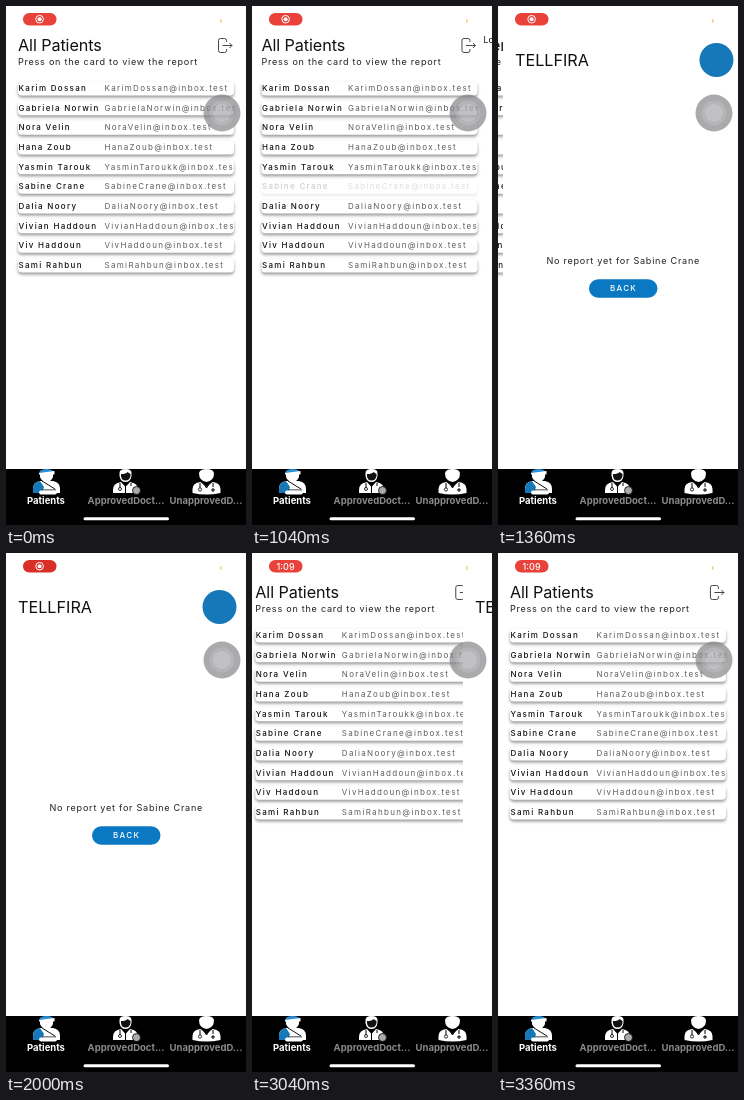
Write an HTML page that moves like this. It is 240 by 519 pixels and loops after 3.44 s.

```html
<!DOCTYPE html>
<html lang="en">
<head>
<meta charset="utf-8">
<style>
  html, body { margin: 0; width: 100%; height: 100%; overflow: hidden; background: #fff; }
  svg { display: block; }
  text { font-family: Inter, "Open Sans", sans-serif; fill: #111; white-space: pre; }
  .title { font-size: 16.2px; font-weight: 380; letter-spacing: -.1px; }
  .body { font-size: 9.1px; letter-spacing: .73px; fill: #222; }
  .cell { font-size: 8px; letter-spacing: 1.33px; }
  .name { font-weight: 500; letter-spacing: 1.3px; }
  .mail { fill: #5c5c5c; }
  .mid { text-anchor: middle; }
  .tab { font-size: 9.5px; font-weight: 700; fill: #8a8a8a; }
  .card { fill: #fff; filter: drop-shadow(0 2.2px 1.4px rgba(0, 0, 0, .4)); }
</style>
</head>
<body>
<svg width="240" height="519" viewBox="0 0 240 519">
  <rect width="240" height="519" fill="#fff"/>

  <g id="list">
    <text class="title" x="12" y="45">All Patients</text>
    <text class="body" x="12" y="59">Press on the card to view the report</text>
    <path d="M220.500 36v-1.500q0-2-2-2h-4q-2 0-2 2v10q0 2 2 2h4q2 0 2-2v-1.500M216.500 39.500h9.500m-2.500-2.500 2.500 2.500-2.500 2.500"
      fill="none" stroke="#333" stroke-width=".9"/>
    <g id="rows"></g>
  </g>

  <g id="report">
    <rect y="24" width="240" height="440" fill="#fff"/>
    <text id="loading" x="0" y="37" style="font-size:8.6px">Loading...</text>
    <g id="content">
      <text class="title" x="12" y="59.6" style="letter-spacing:0">TELLFIRA</text>
      <circle cx="213.5" cy="54" r="17" fill="#1678b8"/>
      <text class="body mid" x="120.3" y="258">No report yet for Sabine Crane</text>
      <g id="back">
        <rect x="86" y="273.3" width="68.5" height="18.5" rx="9.25" fill="#0a78c2"/>
        <text class="cell mid" x="120.6" y="285.4" style="fill:#fff;font-weight:500">BACK</text>
      </g>
    </g>
  </g>

  <!-- status bar -->
  <rect id="pill" x="17" y="7" width="33.5" height="12.5" rx="6.25"/>
  <g id="record">
    <circle cx="33.6" cy="13.2" r="3.8" fill="none" stroke="#fff" stroke-width="1"/>
    <circle cx="33.6" cy="13.2" r="2" fill="#fff"/>
  </g>
  <text id="clock" class="mid" x="33.6" y="16.5" style="font-size:9px;font-weight:500;fill:#fff">1:09</text>
  <rect x="214" y="13" width="1.6" height="4" rx=".8" fill="#f3cf8c"/>

  <!-- floating touch button -->
  <circle cx="216" cy="107" r="18.5" fill="#858588" fill-opacity=".69"/>
  <circle cx="216" cy="107" r="12.5" fill="#fff" fill-opacity=".13"/>
  <circle cx="216" cy="107" r="9" fill="#fff" fill-opacity=".17"/>

  <!-- tab bar -->
  <rect y="463" width="240" height="56" fill="#000"/>
  <g>
    <path d="M34 468h13v3q-2 5-6.5 5t-6.5-5z" fill="#fff"/>
    <path d="M33 467q1-4 7.5-4t8 4z" fill="#2b8fd6"/>
    <path d="M33 467l15.5-2v3.5h-15.5z" fill="#fff"/>
    <path d="M27 487v-4q0-7 7-8h13q7 1 7 8v4z" fill="#fff"/>
    <path d="M27 487v-4q0-7 7-8l4 6-2 6z" fill="#1678b8"/>
    <path d="M36 475l13 8M36 484h14" fill="none" stroke="#111" stroke-width="1"/>
    <rect x="33" y="484.5" width="18" height="4" rx="2" fill="#fff"/>
  </g>
  <g>
    <path d="M113.5 467q0-4 6-4t6 4v3q-1 6-6 6t-6-6z" fill="#fff"/>
    <path d="M115 468q5 0 6.500-2l3 2v2q-1 4.500-5 4.500t-4.500-4.500z" fill="#111"/>
    <path d="M107 487v-3q0-7 8-8l4.500 5 4.500-5q8 1 8 8v3z" fill="#fff"/>
    <path d="M119.500 480v7M114 477v5m11-5v3" stroke="#000" stroke-width="1"/>
    <circle cx="114" cy="483" r="1.500" fill="none" stroke="#000" stroke-width=".8"/>
    <circle cx="130.500" cy="484.500" r="4" fill="#aaa" stroke="#000" stroke-width=".8"/>
  </g>
  <g>
    <path d="M193 467q1-4 7.500-4t7.500 4q0 8-7.500 9-7.500-1-7.500-9z" fill="#fff"/>
    <path d="M186.500 487v-4q0-6 8-7l6 5 6-5q8 1 8 7v4q-14 3-28 0z" fill="#fff"/>
    <path d="M194 477v5m13-5v4M198 478l2.500 4 2.500-4" fill="none" stroke="#000" stroke-width="1"/>
    <circle cx="194" cy="483.500" r="1.600" fill="none" stroke="#000" stroke-width=".8"/>
    <path d="M205 484h4m-2-2v4" stroke="#000" stroke-width="1"/>
  </g>
  <text class="tab mid" x="40" y="497.5" style="fill:#fff">Patients</text>
  <text class="tab mid" x="120" y="497.5">ApprovedDoct...</text>
  <text class="tab mid" x="200" y="497.5">UnapprovedD...</text>
  <rect x="77.5" y="511.2" width="85.5" height="3" rx="1.5" fill="#fff"/>
</svg>

<script>
const LOOP = 3440, STEP = 80, WIDTH = 240;
const PUSH = 1023, POP = 2828;
const $ = id => document.getElementById(id);

const patients = ["Karim Dossan", "Gabriela Norwin", "Nora Velin", "Hana Zoub", "Yasmin Tarouk",
  "Sabine Crane", "Dalia Noory", "Vivian Haddoun", "Viv Haddoun", "Sami Rahbun"];

$("rows").innerHTML = patients.map((name, i) => {
  const user = name.replace(" ", "") + (i === 4 ? "k" : "");
  return `<g transform="translate(12 ${75.5 + i * 19.67})">
    <rect class="card" width="216" height="14" rx="4"/>
    <svg width="216" height="14">
      <text class="cell name" x=".5" y="9.4">${name}</text>
      <text class="cell mail" x="86.5" y="9.4">${user}@inbox.test</text>
    </svg></g>`;
}).join("");
const pressedRow = $("rows").children[5];

const ramp = (t, from, to) => Math.min(1, Math.max(0, (t - from) / (to - from)));

// Remaining distance of a critically damped spring.
function spring(ms) {
  const x = Math.max(0, ms) * .0172;
  return (1 + x) * Math.exp(-x);
}

// Dims while a finger is down.
const touch = (t, down, up) => 1 - .8 * (ramp(t, down, down + 120) - ramp(t, up, up + 200));

const show = (id, on) => $(id).setAttribute("visibility", on ? "visible" : "hidden");
const slide = (id, x) => $(id).setAttribute("transform", `translate(${x} 0)`);

function draw(t) {
  const open = t < POP ? 1 - spring(t - PUSH) : spring(t - POP);
  slide("list", -.3 * WIDTH * open);
  slide("report", WIDTH * (1 - open));

  const loaded = t >= 1200;
  show("loading", !loaded);
  show("content", loaded);

  pressedRow.setAttribute("opacity", touch(t, 900, 1060));
  $("back").setAttribute("opacity", touch(t, 2560, 2800));

  const clock = ramp(t, 2240, 2400);
  $("clock").setAttribute("opacity", clock);
  $("record").setAttribute("opacity", 1 - clock);

  const dark = Math.exp(-(((t - 2000) / 300) ** 2));
  $("pill").setAttribute("fill", `rgb(${232 - 16 * dark},${66 - 18 * dark},${58 - 18 * dark})`);
}

function tick() {
  const t = performance.now() % LOOP;
  draw(Math.floor(t / STEP) * STEP);
  requestAnimationFrame(tick);
}
tick();
</script>
</body>
</html>
```
